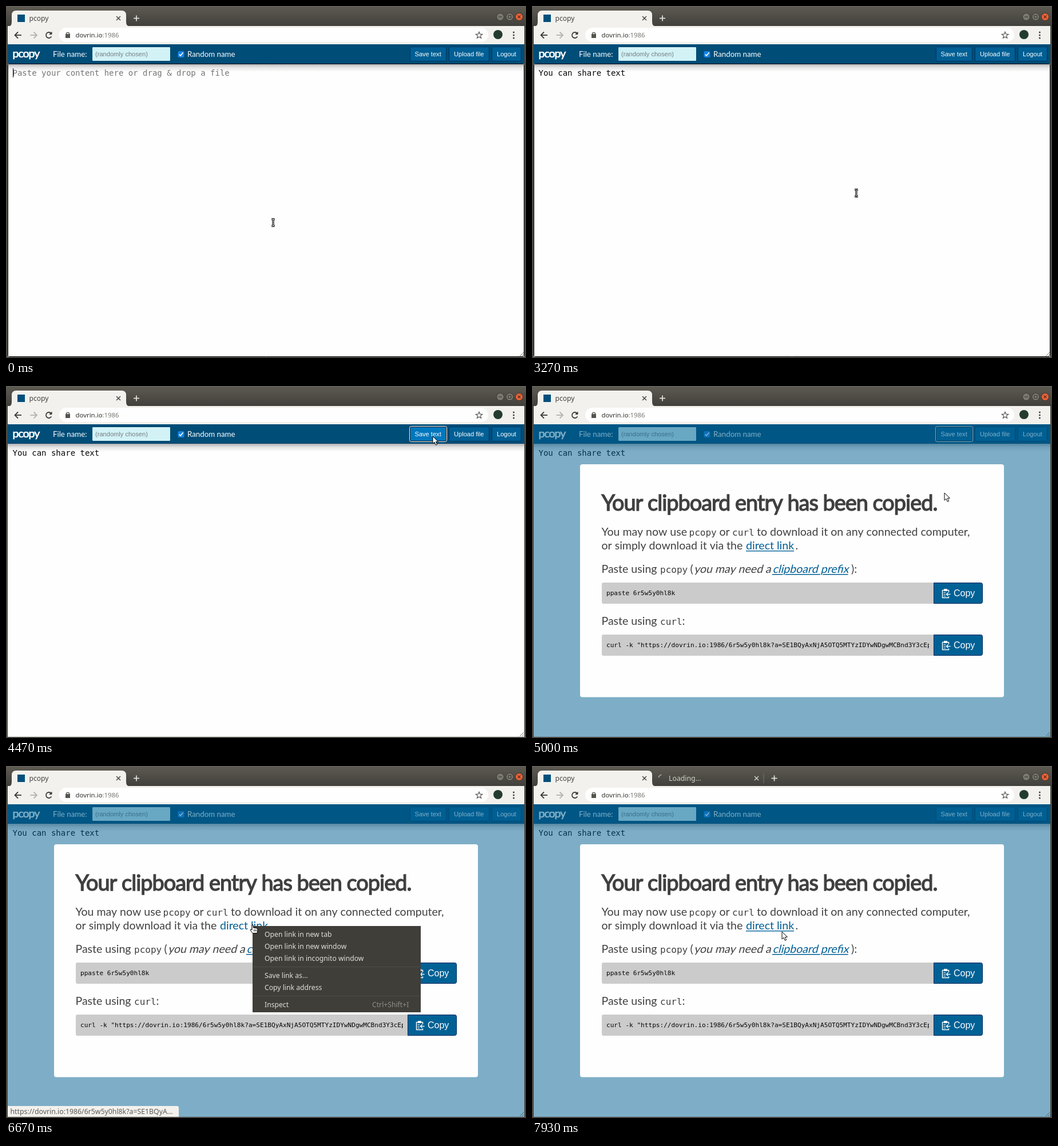
Animation, 909 px wide and 616 px high, one loop 8 s. Source, as an HTML page with a canvas:

```html
<!DOCTYPE html>
<html lang="en">
<head>
<meta charset="utf-8">
<title>pcopy</title>
<style>
html, body { margin: 0; width: 100%; height: 100%; overflow: hidden; background: #45443e; }
canvas { display: block; }
</style>
</head>
<body>
<canvas id="stage" width="909" height="616"></canvas>
<script>
const ctx = document.getElementById('stage').getContext('2d');
const LOOP = 8000;
const UI = '"Noto Sans", "Open Sans", sans-serif';
const LATO = 'Lato, sans-serif';
const ARIAL = '"Liberation Sans", Arial, sans-serif';
const MONO = '"DejaVu Sans Mono", monospace';
const HOST = 'dovrin.io';
const ENTRY = '6r5w5y0hl8k';
const INK = '#404040', LINK = '#005f96';
const BODY = 19.55;

const MESSAGE = 'You can share text';
// [time, characters typed]
const TYPED = [[270, 1], [470, 2], [530, 3], [600, 4], [730, 5], [870, 6], [1000, 7], [1130, 8],
  [1330, 10], [1400, 11], [1530, 13], [1670, 14], [1730, 15], [1870, 16], [2070, 17], [2270, 18]];
// [time, x, y]
const MOUSE = [[3070, 467, 379], [3270, 566, 328], [3530, 800, 178], [3670, 890, 105], [3800, 850, 84],
  [3930, 769, 84], [4070, 746, 88], [4530, 746, 88], [4700, 738, 120], [5000, 721, 187], [5130, 717, 196],
  [5600, 600, 240], [6000, 451, 278], [6330, 433, 278], [6930, 433, 278], [7200, 437, 290]];
const MENU = [['Open link in new tab', 294], ['Open link in new window', 315], ['Open link in incognito window', 336],
  ['Save link as…', 366], ['Copy link address', 387], ['Inspect', 417]];

const clamp = v => Math.max(0, Math.min(1, v));

function mouseAt(t) {
  const i = MOUSE.findIndex(p => p[0] > t);
  if (i === 0) return MOUSE[0].slice(1);
  if (i < 0) return MOUSE[MOUSE.length - 1].slice(1);
  const [t0, x0, y0] = MOUSE[i - 1], [t1, x1, y1] = MOUSE[i];
  const k = (t - t0) / (t1 - t0);
  return [x0 + (x1 - x0) * k, y0 + (y1 - y0) * k];
}

function rect(x, y, w, h, fill) {
  ctx.fillStyle = fill;
  ctx.fillRect(x, y, w, h);
}

function box(x, y, w, h, r, fill, border) {
  ctx.beginPath();
  ctx.roundRect(x, y, w, h, r);
  if (fill) { ctx.fillStyle = fill; ctx.fill(); }
  if (border) { ctx.strokeStyle = border; ctx.lineWidth = 1; ctx.stroke(); }
}

function disc(x, y, r, fill) {
  ctx.beginPath();
  ctx.arc(x, y, r, 0, 7);
  ctx.fillStyle = fill;
  ctx.fill();
}

function line(color, width, ...pts) {
  ctx.beginPath();
  pts.forEach(([x, y], i) => i ? ctx.lineTo(x, y) : ctx.moveTo(x, y));
  ctx.strokeStyle = color;
  ctx.lineWidth = width;
  ctx.stroke();
}

function poly(pts, fill, stroke) {
  ctx.beginPath();
  pts.forEach(([x, y]) => ctx.lineTo(x, y));
  ctx.closePath();
  ctx.fillStyle = fill;
  ctx.strokeStyle = stroke;
  ctx.lineWidth = 1;
  ctx.fill();
  ctx.stroke();
}

function text(s, x, y, size, family, color) {
  ctx.font = `${size}px ${family}`;
  ctx.fillStyle = color;
  ctx.fillText(s, x, y);
  return ctx.measureText(s).width;
}

// Regular weight thickened by an outline, tightly spaced
function heading(s, x, y, size, color) {
  ctx.letterSpacing = '-1px';
  text(s, x, y, size, LATO, color);
  ctx.strokeStyle = color;
  ctx.lineWidth = size / 28;
  ctx.strokeText(s, x, y);
  ctx.letterSpacing = '0px';
}

function slanted(x, y, draw) {
  ctx.save();
  ctx.translate(x, y);
  ctx.transform(1, 0, -0.25, 1, 0, 0);
  draw();
  ctx.restore();
}

// The underline leaves gaps around descenders
function link(s, x, y, underline) {
  ctx.font = `${BODY}px ${LATO}`;
  if (underline) {
    rect(x, y + 2, ctx.measureText(s).width, 1.4, LINK);
    ctx.strokeStyle = '#fefefe';
    ctx.lineWidth = 2.6;
    ctx.strokeText(s, x, y);
  }
  text(s, x, y, BODY, LATO, LINK);
}

function cross(x, y, r, color, width = 1.4) {
  line(color, width, [x - r, y - r], [x + r, y + r]);
  line(color, width, [x - r, y + r], [x + r, y - r]);
}

function plus(x, color) {
  line(color, 1.7, [x - 5, 21.5], [x + 5, 21.5]);
  line(color, 1.7, [x, 16.5], [x, 26.5]);
}

function frame() {
  rect(0, 0, 909, 616, '#4a4841');
  const g = ctx.createLinearGradient(0, 0, 0, 36);
  g.addColorStop(0, '#5d5b52');
  g.addColorStop(1, '#413f3a');
  rect(0, 0, 909, 36, g);
  rect(0, 0, 909, 1, '#69675e');
}

function arrow(x, dir, color) {
  line(color, 1.8, [x - 5.5, 51], [x + 5.5, 51]);
  line(color, 1.8, [x + dir * 0.5, 45.5], [x + dir * 6, 51], [x + dir * 0.5, 56.5]);
}

function newTab(t) {
  const k = clamp((t - 7600) / 230);
  const grow = 195.5 * (1 - (1 - k) ** 2);
  plus(228 + grow, '#e4e3dd');
  if (grow < 12) return;
  ctx.save();
  ctx.beginPath();
  ctx.rect(210, 0, grow + 1, 36);
  ctx.clip();
  const a = -2.9 + (t - 7930) / 160;
  ctx.beginPath();
  ctx.arc(228, 22, 7, a, a + 1.1);
  ctx.strokeStyle = '#aaa89f';
  ctx.lineWidth = 1.5;
  ctx.stroke();
  text('Loading…', 239, 26, 12.3, UI, '#d3d2cb');
  cross(197 + grow, 21.5, 3.5, '#d3d2cb');
  rect(209 + grow, 13, 1, 17, '#77756c');
  ctx.restore();
}

function browser(t) {
  ctx.beginPath();
  ctx.moveTo(3, 36);
  ctx.quadraticCurveTo(10, 36, 10, 28);
  ctx.lineTo(10, 16);
  ctx.quadraticCurveTo(10, 8, 18, 8);
  ctx.lineTo(202, 8);
  ctx.quadraticCurveTo(210, 8, 210, 16);
  ctx.lineTo(210, 28);
  ctx.quadraticCurveTo(210, 36, 218, 36);
  ctx.fillStyle = '#f2f1ed';
  ctx.fill();
  rect(20, 15, 13, 13, '#004f7c');
  text('pcopy', 40.5, 26, 12.1, UI, '#44433f');
  cross(196.5, 21.5, 3.5, '#44433f');
  newTab(t);

  for (const x of [864, 880.5]) {
    disc(x, 19, 6.8, '#3d3c36');
    disc(x, 19, 5.9, '#7b796f');
  }
  line('#3c3b36', 1.2, [861, 19], [867, 19]);
  ctx.strokeRect(878, 16.5, 5, 5);
  disc(897, 19, 6.8, '#4a3228');
  disc(897, 19, 6, '#ee6237');
  cross(897, 19, 2.4, '#4b2a1b', 1.3);

  rect(3, 35, 903, 32, '#f2f1ed');
  box(93, 38, 750, 25, 12.5, '#fefefe');
  arrow(21.5, -1, '#3d3c39');
  arrow(48, 1, '#b5b4af');
  ctx.beginPath();
  ctx.arc(75, 51, 5, 0.5, 5.6);
  ctx.strokeStyle = '#3d3c39';
  ctx.lineWidth = 1.8;
  ctx.stroke();
  poly([[80, 45.5], [80, 49.5], [76, 49.5]], '#3d3c39', '#3d3c39');
  rect(104, 49, 8, 7, '#55544f');
  ctx.beginPath();
  ctx.arc(108, 49, 2.6, Math.PI, 0);
  ctx.strokeStyle = '#55544f';
  ctx.lineWidth = 1.3;
  ctx.stroke();
  const w = text(HOST, 121.5, 55, 11.4, UI, '#33322f');
  text(':1986', 121.5 + w, 55, 11.4, UI, '#777670');

  ctx.beginPath();
  for (let i = 0; i < 10; i++) {
    const r = i % 2 ? 2.6 : 6, a = i * Math.PI / 5 - Math.PI / 2;
    ctx.lineTo(827 + r * Math.cos(a), 51.3 + r * Math.sin(a));
  }
  ctx.closePath();
  ctx.strokeStyle = '#55544f';
  ctx.lineWidth = 1.2;
  ctx.stroke();
  disc(860, 50, 8, '#243c30');
  for (const y of [46, 51, 56]) disc(887.5, y, 1.5, '#44433f');
}

function navButton(label, x, w, tx, hover) {
  box(x + 0.5, 71.5, w - 1, 25, 2, hover ? '#0077bd' : '#005f94', '#003463');
  text(label, tx, 88, 11.1, ARIAL, '#fefefe');
}

function page(t, mx, my) {
  const modal = t >= 4600;
  const focused = t < 4330;
  rect(3, 101, 903, 513, '#fefefe');
  const g = ctx.createLinearGradient(0, 101, 0, 115);
  g.addColorStop(0, 'rgba(40,40,50,.36)');
  g.addColorStop(0.45, 'rgba(40,40,50,.12)');
  g.addColorStop(1, 'rgba(40,40,50,0)');
  rect(3, 101, 903, 14, g);
  if (focused) box(3.5, 101.5, 902, 512, 2, null, '#15181c');
  line('#777', 1, [898, 613], [905, 606]);
  line('#777', 1, [902, 613], [905, 610]);

  let n = 0;
  for (const [at, count] of TYPED) if (t >= at) n = count;
  if (n) text(MESSAGE.slice(0, n), 11.5, 122, 14, MONO, '#050505');
  else text('Paste your content here or drag & drop a file', 11.5, 122, 14, MONO, '#757575');
  const caret = focused && (t < 130 || t >= 270 && t < 2870 || t >= 3470 && t < 4070);
  if (caret) rect(12 + Math.round(n * 8.43), 109, 1, 16, '#000');

  rect(3, 67, 903, 34, '#004d78');
  rect(3, 100, 903, 1, '#003d63');
  heading('pcopy', 11.5, 90, 19.5, '#fefefe');
  text('File name:', 82, 89, 13.3, LATO, '#fefefe');
  box(150.5, 71.5, 137, 25, 2, '#d2f2f6', '#003f68');
  text('(randomly chosen)', 156, 87.5, 11.1, ARIAL, '#757d80');
  box(300.5, 79, 11, 11, 2, '#1681e4');
  line('#fff', 1.7, [302.7, 84.6], [305, 87], [309.5, 81.5]);
  text('Random name', 317, 89, 13.3, LATO, '#fefefe');

  const over = (x, w) => !modal && mx >= x && mx < x + w && my > 71 && my < 97;
  navButton('Save text', 706, 64, 714.5, over(706, 64));
  navButton('Upload file', 774, 71, 783, over(774, 71));
  navButton('Logout', 849, 52, 858, over(849, 52));
  if (!focused && t < 6670) {
    box(706.5, 71.5, 63, 25, 2, null, '#101418');
    box(705.5, 70.5, 65, 27, 3, null, '#fefefe');
  }
}

function commandRow(y, command) {
  box(122, y, 581, 37, [3, 0, 0, 3], '#cbcbcb');
  ctx.save();
  ctx.beginPath();
  ctx.rect(122, y, 572, 37);
  ctx.clip();
  text(command, 130, y + 22, 11.1, MONO, '#050505');
  ctx.restore();
  box(702.5, y + 0.5, 85, 36, [0, 3, 3, 0], '#006195', '#00255c');
  text('Copy', 737, y + 24, 16, ARIAL, '#fefefe');

  const w = '#fefefe';
  line(w, 1.4, [728.5, y + 17], [728.5, y + 13.5], [717.5, y + 13.5], [717.5, y + 26.5], [728.5, y + 26.5], [728.5, y + 24.5]);
  rect(720, y + 11, 6, 4, w);
  for (const dy of [17.5, 20.5, 23.5]) line(w, 1.1, [719.5, y + dy], [723, y + dy]);
  line(w, 1.4, [731.5, y + 20.5], [724.5, y + 20.5]);
  line(w, 1.4, [727.5, y + 17.5], [724.5, y + 20.5], [727.5, y + 23.5]);
}

function dialog(hover) {
  rect(3, 67, 903, 547, 'rgba(0,96,146,.5)');
  box(84, 137, 741, 407.5, 4, '#fefefe');
  heading('Your clipboard entry has been copied.', 121.5, 218, 37.9, INK);
  const say = (s, x, y) => text(s, x, y, BODY, LATO, INK);
  const code = (s, x, y) => text(s, x, y, 16, MONO, INK);
  say('You may now use', 121.5, 262);
  code('pcopy', 274.5, 262);
  say('or', 327.5, 262);
  code('curl', 350, 262);
  say('to download it on any connected computer,', 393, 262);
  say('or simply download it via the', 121.5, 286);
  link('direct link', 374, 286, !hover);
  say('.', 460.5, 286);
  say('Paste using', 121.5, 327);
  code('pcopy', 224, 327);
  say('(', 276.5, 327);
  slanted(283, 327, () => say('you may need a', 0, 0));
  slanted(420.5, 327, () => link('clipboard prefix', 0, 0, true));
  say('):', 558, 327);
  commandRow(344, 'ppaste ' + ENTRY);
  say('Paste using', 121.5, 418);
  code('curl', 224, 418);
  say(':', 262.5, 418);
  commandRow(435, `curl -k "https://${HOST}:1986/${ENTRY}?a=SE1BQyAxNjA5OTQ5MTYzIDYwNDgwMCBnd3Y3cEp`);
}

function status(t) {
  if (t < 6470 || t >= 7000) return;
  ctx.globalAlpha = t < 6530 ? 0.5 : 1;
  box(3, 595, 299, 19, [0, 3, 0, 0], '#f2f1ed');
  text(`https://${HOST}:1986/${ENTRY}?a=SE1BQyA…`, 7.5, 608.5, 12.3, UI, '#5b5a55');
  ctx.globalAlpha = 1;
}

function menu(t, my) {
  if (t < 6670 || t >= 7600) return;
  ctx.save();
  if (t >= 6730) {
    ctx.shadowColor = 'rgba(0,0,0,.4)';
    ctx.shadowBlur = 18;
    ctx.shadowOffsetY = 5;
  }
  rect(431, 280, 294, 151, '#3f3e39');
  ctx.restore();
  if (my > 284) rect(431, 284, 294, 21, '#ee7748');
  for (const y of [351, 402]) rect(432, y, 292, 1, '#4e4d47');
  for (const [label, y] of MENU) text(label, 452, y + 4.5, 12.2, UI, '#e0dfd8');
  text('Ctrl+Shift+I', 640, 421.5, 12.2, UI, '#8f8e86');
}

function ibeam(x, y) {
  for (const [color, w] of [['#000', 3.2], ['#fff', 1]]) {
    for (const d of [-1, 1]) line(color, w, [x - 3, y + d * 6], [x - 1, y + d * 6], [x, y + d * 5], [x + 1, y + d * 6], [x + 3, y + d * 6]);
    line(color, w, [x, y - 5], [x, y + 5]);
  }
}

function pointer(x, y) {
  poly([[x, y], [x, y + 13], [x + 3, y + 10.3], [x + 5.3, y + 15.3], [x + 7.6, y + 14.3], [x + 5.4, y + 9.4], [x + 9.4, y + 9.2]],
    '#fff', '#000');
}

function hand(x, y) {
  poly([[x - 3, y], [x - 1, y], [x - 0.5, y + 5], [x + 6, y + 6], [x + 7, y + 8], [x + 6, y + 14.5],
    [x - 2, y + 14.5], [x - 6, y + 9], [x - 5, y + 7.5], [x - 3, y + 9]], '#fff', '#000');
  for (const dx of [0.5, 2.5, 4.5]) line('#000', 0.8, [x + dx, y + 8], [x + dx, y + 11.5]);
}

function draw(t) {
  const [mx, my] = mouseAt(t);
  const modal = t >= 4600;
  const hover = modal && mx < 461 && my > 268 && t < 7000;
  ctx.lineJoin = 'miter';
  frame();
  browser(t);
  page(t, mx, my);
  if (modal) dialog(hover);
  status(t);
  menu(t, my);
  const overText = modal ? my > 246 && my < 266 : my > 101;
  if (hover && t < 6930) hand(mx, my);
  else if (overText) ibeam(mx, my);
  else pointer(mx, my);
}

function tick(now) {
  draw(now % LOOP);
  requestAnimationFrame(tick);
}
requestAnimationFrame(tick);
</script>
</body>
</html>
```
